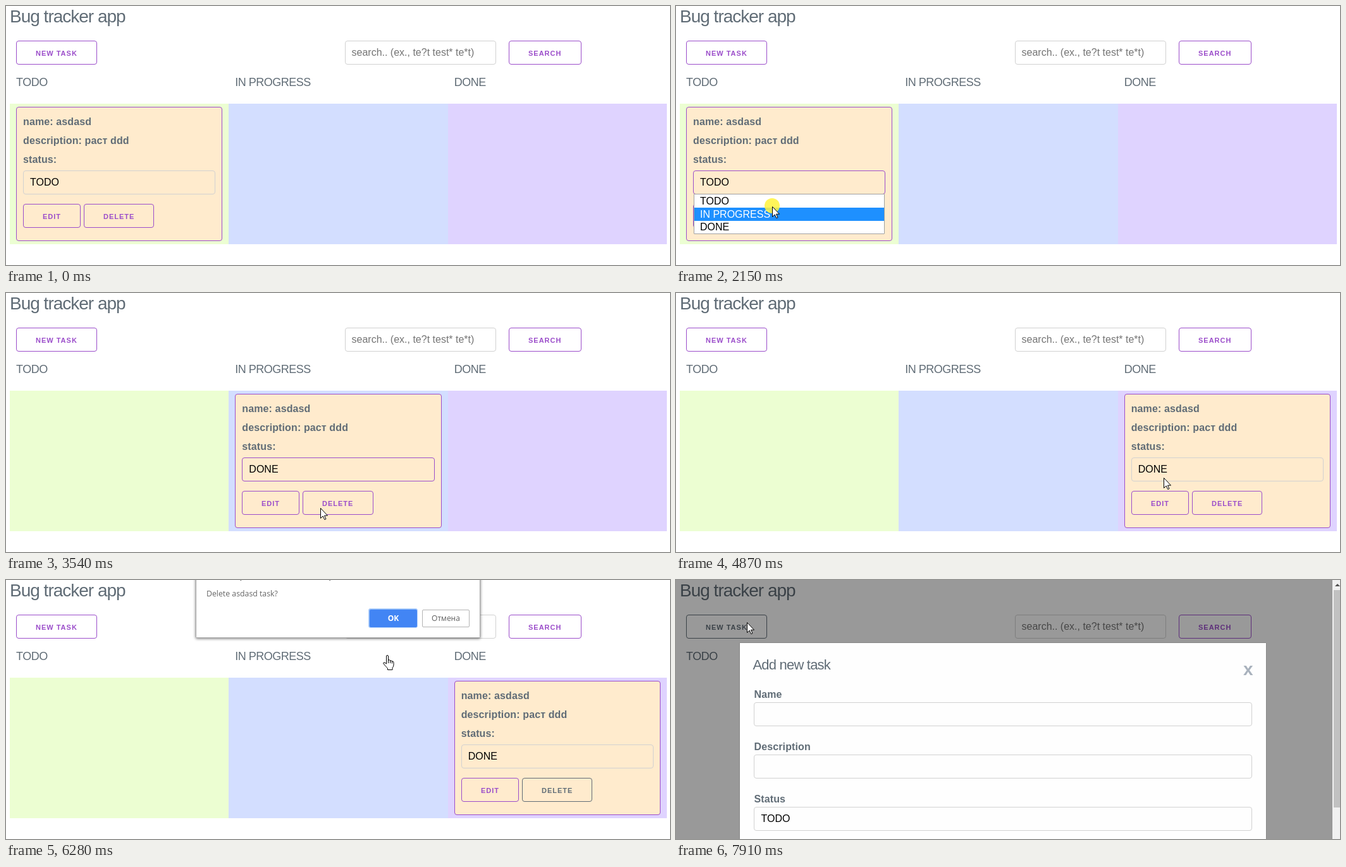
These frames come from a looping animation (1050 px wide and 411 px high, 7.99 s). An HTML page with a canvas:

```html
<!DOCTYPE html>
<html lang="en">
<head>
<meta charset="utf-8">
<title>Bug tracker app</title>
<style>
  html, body { margin: 0; width: 100%; height: 100%; overflow: hidden; background: #fff; }
  canvas { display: block; width: 1050px; height: 411px; }
</style>
</head>
<body>
<canvas id="stage" width="1050" height="411"></canvas>
<script>
const ctx = document.getElementById('stage').getContext('2d');
const LOOP = 7990, TICK = 76.8;
const ARIAL = '"Liberation Sans", Arial, sans-serif';
const UI = '"Open Sans", "Noto Sans", sans-serif';
const GRAY = '#606c76', PURPLE = '#9b4dca', LINE = '#d1d1d1';
const COL = 346.333;
const STATUS = ['TODO', 'IN PROGRESS', 'DONE'];
const COLUMN_FILL = ['#ecfed2', '#d3deff', '#dfd3ff'];

// Ticks at which the page responds to a click.
const AT = { open: 19, pick: 29, reopen: 38, repick: 46, dialog: 76, removed: 92, modal: 101 };
const CLICKS = Object.values(AT).map(k => k - 1);

// Pointer moves: first tick, last tick, destination.
const MOVES = [
  [2, 6, 554, 195],
  [8, 17, 148, 286],
  [22, 25, 152, 318],
  [30, 36, 489, 288],
  [38, 42, 497, 341],
  [48, 54, 800, 215],
  [54, 59, 497, 130],
  [59, 60, 472, 148],
  [61, 63, 771, 293],
  [63, 65, 872, 362],
  [65, 67, 878, 330],
  [76, 82, 603, 119],
  [82, 86, 582, 73],
  [93, 98, 112, 67]
];

const within = (k, a, b) => k >= a && k < b;
const clamp = v => Math.min(1, Math.max(0, v));
const ease = p => p * p * (3 - 2 * p);

function text(str, x, y, font, color, spacing = 0) {
  ctx.font = font;
  ctx.letterSpacing = spacing + 'px';
  ctx.fillStyle = color;
  ctx.fillText(str, x, y);
}

const label = (str, x, y) => text(str, x, y, 'bold 16px ' + ARIAL, GRAY, .12);

// Rounded 1px outline whose edges snap to whole pixels.
function box(x1, y1, x2, y2, stroke, fill, radius = 4) {
  x1 = Math.round(x1);
  x2 = Math.round(x2);
  ctx.beginPath();
  ctx.roundRect(x1 + .5, y1 + .5, x2 - x1 - 1, y2 - y1 - 1, radius - .5);
  if (fill) { ctx.fillStyle = fill; ctx.fill(); }
  ctx.strokeStyle = stroke;
  ctx.lineWidth = 1;
  ctx.stroke();
}

function rect(x, y, w, h, fill) {
  ctx.fillStyle = fill;
  ctx.fillRect(x, y, w, h);
}

function button(str, x1, y, x2, hover) {
  const color = hover ? GRAY : PURPLE;
  box(x1, y, x2, y + 38, color);
  text(str, Math.round(x1) + 31, y + 24, 'bold 11px ' + ARIAL, color, 1);
}

function header(k) {
  text('Bug tracker app', 6, 26, '28px ' + ARIAL, GRAY, -1);
  button('NEW TASK', 16, 55, 144, k >= 98);
  box(536, 55, 775, 93, LINE);
  text('search.. (ex., te?t test* te*t)', 546.5, 79, '16px ' + ARIAL, '#757575');
  button('SEARCH', 795, 55, 910);
  STATUS.forEach((s, i) => text(s, 16 + i * COL, 127, '18px ' + ARIAL, GRAY, -.5));
}

function card(col, status, focus, hoverDelete) {
  const x = col * COL;
  box(16 + x, 160, 342.33 + x, 373, PURPLE, '#ffebcd');
  label('name: asdasd', 27 + x, 189);
  label('description: раст ddd', 27 + x, 219);
  label('status:', 27 + x, 249);
  box(27 + x, 261, 331.33 + x, 299, focus ? PURPLE : LINE);
  text(STATUS[status], 38 + x, 285, '16px ' + ARIAL, '#000');
  button('EDIT', 27 + x, 314, 118 + x);
  button('DELETE', 123 + x, 314, 234.3 + x, hoverDelete);
}

function dropdown(col, active) {
  const x = Math.round(28 + col * COL);
  box(x, 298, x + 302, 362, '#a0a0a0', '#fff', 1);
  STATUS.forEach((s, i) => {
    const y = 299 + i * 20.7;
    if (i === active) rect(x + 1, Math.round(y), 300, 21, '#1e90ff');
    text(s, x + 10, y + 16, '16px ' + ARIAL, i === active ? '#fff' : '#000');
  });
}

function board(k) {
  if (k >= AT.removed) return;
  COLUMN_FILL.forEach((fill, i) => {
    const left = Math.round(6 + i * COL);
    rect(left, 155, Math.round(6 + (i + 1) * COL) - left, 223, fill);
  });
  const status = (k >= AT.pick) + (k >= AT.repick);
  const col = (k > AT.pick) + (k > AT.repick);
  const focus = within(k, AT.open - 1, AT.pick + 1) || within(k, AT.reopen - 1, AT.repick + 1);
  card(col, status, focus, k >= 66);
  if (within(k, AT.open, AT.pick)) dropdown(0, k < 25 ? 0 : 1);
  if (within(k, AT.reopen, AT.repick)) dropdown(1, k < 42 ? 1 : 2);
}

function dialog(k) {
  if (!within(k, AT.dialog, AT.removed + 3)) return;
  const hidden = clamp((AT.dialog + 2 - k) / 3) + clamp((k - AT.removed + 2) / 5);
  ctx.save();
  ctx.globalAlpha = 1 - hidden ** 5;
  ctx.translate(525, -9 * hidden);
  ctx.scale(1 + hidden * .006, 1);
  ctx.translate(-525, 0);

  ctx.save();
  ctx.shadowColor = 'rgba(0,0,0,.5)';
  ctx.shadowBlur = 4;
  ctx.shadowOffsetY = 1;
  box(300, -60, 750, 92, '#a6a6a6', '#fff', 2);
  ctx.restore();
  rect(301, -50, 448, 141, '#fff');

  text('Подтверждение на этой странице', 317, -3, '15px ' + UI, '#333');
  text('Delete asdasd task?', 317, 25.5, '12.3px ' + UI, '#666');
  box(573, 45, 651, 76, '#b4d2fb', '#8fbaf8', 3);
  box(575, 47, 650, 75, '#4285f4', '#4285f4', 2);
  box(658, 47, 733, 75, '#b4b4b4', '#fff', 2);
  ctx.textAlign = 'center';
  text('OK', 612.5, 65, 'bold 12px ' + UI, '#fff');
  text('Отмена', 695.5, 65, '12px ' + UI, '#606060');
  ctx.restore();
}

function modal(k) {
  if (k < AT.modal) return;
  rect(0, 0, 1038, 411, 'rgba(0,0,0,.4)');
  rect(1038, 0, 12, 411, '#f1f1f1');
  rect(1040, 16, 10, 345, '#c1c1c1');
  ctx.fillStyle = '#505050';
  ctx.fill(new Path2D('M1042 10L1046 6L1050 10Z'));

  box(100, 99, 934, 430, '#888', '#fefefe', 1);
  text('Add new task', 121.5, 142, '22px ' + ARIAL, GRAY, -.8);
  text('x', 897, 151, 'bold 28px ' + ARIAL, '#a9b2bd');
  ['Name', 'Description', 'Status'].forEach((s, i) => {
    const y = 187 + i * 83;
    label(s, 123.5, y);
    box(123, y + 7, 911, y + 45, LINE);
  });
  text('TODO', 134.5, 384, '16px ' + ARIAL, '#000');
}

const ARROW = new Path2D('M.5 .5V16.5L4.2 13L6.8 18.6L9 17.6L6.5 12.2H11.5Z');
const HAND = new Path2D('M5.5 14V2Q5.5 .5 7 .5Q8.5 .5 8.5 2V8Q11 7 11.5 9Q14 8.3 14.3 10' +
  'Q17 9.5 17 12V16Q16.6 19 15 20.5V23.5H7.5V21Q4 18 .8 13.5Q.5 11.3 3 12Z' +
  'M8.5 8V13M11.5 9V13M14.3 10V13.5');

function pointerAt(k) {
  let x = 945, y = 430;
  for (const [from, to, x1, y1] of MOVES) {
    const p = ease(clamp((k - from) / (to - from)));
    x += (x1 - x) * p;
    y += (y1 - y) * p;
  }
  return [Math.round(x), Math.round(y)];
}

function pointer(k) {
  if (k < 3) return;
  const [x, y] = pointerAt(k);
  if (CLICKS.includes(k)) {
    ctx.beginPath();
    ctx.arc(x, y - 1, 12, 0, 7);
    ctx.fillStyle = 'rgba(255,243,60,.85)';
    ctx.fill();
  }
  // Text beam over the search field.
  if (within(k, AT.removed, AT.removed + 2)) {
    rect(x, y - 5, 1, 12, '#1f6b1f');
    rect(x - 3, y + 7, 3, 1, '#1f6b1f');
    rect(x + 1, y + 7, 3, 1, '#1f6b1f');
    return;
  }
  const hand = within(k, 66, 84) || within(k, 97, AT.modal);
  const shape = hand ? HAND : ARROW;
  ctx.save();
  ctx.translate(hand ? x - 7 : x, y);
  ctx.fillStyle = '#fff';
  ctx.strokeStyle = '#000';
  ctx.lineWidth = 1;
  ctx.lineJoin = 'round';
  ctx.fill(shape);
  ctx.stroke(shape);
  ctx.restore();
}

function draw(ms) {
  const k = Math.floor((ms % LOOP) / TICK + .3);
  rect(0, 0, 1050, 411, '#fff');
  [header, board, dialog, modal, pointer].forEach(paint => paint(k));
}

const start = performance.now();
function loop() {
  draw(performance.now() - start);
  requestAnimationFrame(loop);
}
loop();
</script>
</body>
</html>
```
